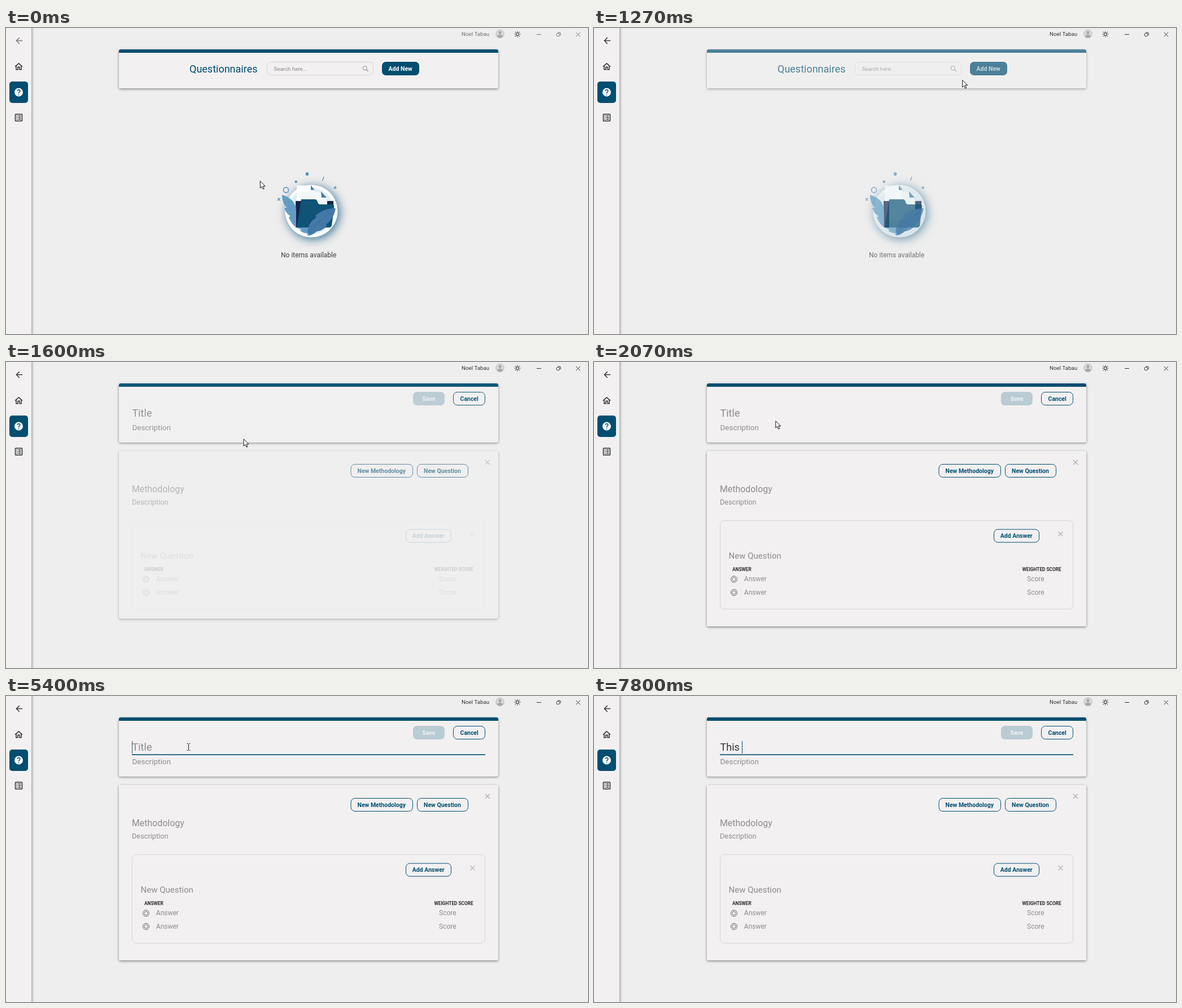
Recreate the animation shown at these times as an HTML page with a canvas. Size 1031 by 543 pixels, loop 8000 ms.

```html
<!DOCTYPE html>
<html lang="en">
<head>
<meta charset="utf-8">
<title>Questionnaires</title>
<style>
html, body { margin: 0; width: 100%; height: 100%; overflow: hidden; background: #eee; }
canvas { display: block; }
</style>
</head>
<body>
<canvas id="stage" width="1031" height="543"></canvas>
<script>
const ctx = document.getElementById('stage').getContext('2d');
const LOOP = 8000, STEP = 1000 / 15;
const BLUE = '#004e70', PAGE = '#eee', PANEL = '#f2f0f1', HINT = '#8d8c8c', DARK = '#2d2d2d';

const clamp = v => Math.max(0, Math.min(1, v));
const ramp = (t, from, to) => clamp((t - from) / (to - from));
const easeOut = v => 1 - (1 - v) ** 2;

function text(str, x, y, size, color, weight = 400) {
  ctx.font = `${weight} ${size}px Roboto, sans-serif`;
  ctx.fillStyle = color;
  ctx.fillText(str, x, y);
}

function box(x, y, w, h, r, fill, stroke) {
  ctx.beginPath();
  ctx.roundRect(x, y, w, h, r);
  if (fill) { ctx.fillStyle = fill; ctx.fill(); }
  if (stroke) { ctx.strokeStyle = stroke; ctx.lineWidth = 1; ctx.stroke(); }
}

function disc(x, y, r, fill, stroke, width = 1) {
  ctx.beginPath();
  ctx.arc(x, y, r, 0, Math.PI * 2);
  if (fill) { ctx.fillStyle = fill; ctx.fill(); }
  if (stroke) { ctx.strokeStyle = stroke; ctx.lineWidth = width; ctx.stroke(); }
}

function shape(d, fill, stroke, width = 1) {
  const p = new Path2D(d);
  if (fill) { ctx.fillStyle = fill; ctx.fill(p, 'evenodd'); }
  if (stroke) { ctx.strokeStyle = stroke; ctx.lineWidth = width; ctx.stroke(p); }
}

// Icon on a 24-unit grid, drawn 18 px wide around a centre.
function icon(d, x, y, color) {
  ctx.save();
  ctx.translate(x - 9, y - 9);
  ctx.scale(.75, .75);
  shape(d, color);
  ctx.restore();
}

function layer(alpha, draw) {
  if (alpha <= 0) return;
  ctx.save();
  ctx.globalAlpha = alpha;
  draw();
  ctx.restore();
}

function shadowed(color, blur, dx, dy, draw) {
  ctx.save();
  ctx.shadowColor = color;
  ctx.shadowBlur = blur;
  ctx.shadowOffsetX = dx;
  ctx.shadowOffsetY = dy;
  draw();
  ctx.restore();
}

// The opaque page colour keeps the shadow from showing through while fading.
function card(y, h) {
  const alpha = ctx.globalAlpha;
  shadowed('rgba(0,0,0,.46)', 4, 0, 1.5, () => box(200, y, 672, h, 3, PANEL));
  ctx.globalAlpha = 1;
  box(200, y, 672, h, 3, PAGE);
  ctx.globalAlpha = alpha;
  box(200, y, 672, h, 3, PANEL);
}

const topBar = () => box(200, 38, 672, 6, [3, 3, 0, 0], BLUE);

function outlined(label, x, y, w, tx) {
  box(x + .5, y + .5, w - 1, 23, 7, null, BLUE);
  text(label, tx, Math.floor(y + 16), 10.5, BLUE, 700);
}

const cross = (x, y, r, color, width = 1) =>
  shape(`M${x - r} ${y - r}L${x + r} ${y + r}M${x + r} ${y - r}L${x - r} ${y + r}`, null, color, width);

function sidebar(active) {
  shadowed('rgba(0,0,0,.5)', 5, .5, 0, () => {
    ctx.fillStyle = PANEL;
    ctx.fillRect(-10, -10, 55, 563);
  });
  icon('M20 11V13H8L13.5 18.5L12.08 19.92L4.16 12L12.08 4.08L13.5 5.5L8 11Z', 23.2, 22.5, active ? '#383838' : '#7b7b7b');
  icon('M12 5.69L17 10.19V18H15V12H9V18H7V10.19ZM12 3L2 12H5V20H11V14H13V20H19V12H22Z', 22.5, 68.5, DARK);
  box(6, 95, 33, 38, 5, BLUE);
  icon('M15.07 11.25L14.17 12.17C13.45 12.89 13 13.5 13 15H11V14.5C11 13.39 11.45 12.39 12.17 11.67L13.41 10.41C13.78 10.05 14 9.55 14 9A2 2 0 0 0 10 9H8A4 4 0 0 1 16 9C16 9.88 15.64 10.67 15.07 11.25M13 19H11V17H13M12 2A10 10 0 0 0 12 22A10 10 0 0 0 12 2Z', 22.5, 114, '#fff');
  icon('M11 15H17V17H11ZM7 7H9V9H7ZM11 11H17V13H11ZM11 7H17V9H11ZM7 11H9V13H7ZM7 15H9V17H7ZM5 3H19Q21 3 21 5V19Q21 21 19 21H5Q3 21 3 19V5Q3 3 5 3ZM5 5V19H19V5Z', 22.5, 159, DARK);
}

function titleBar(active) {
  const ink = active ? '#333' : '#707070';
  text('Noel Tabau', 807, 14, 9.75, ink);
  disc(875, 10.5, 7.2, '#dcdada', '#a9a9a9', .8);
  disc(875, 8.2, 2.6, '#a8a6a6');
  shape('M870 15.5Q870 11.8 875 11.8Q880 11.8 880 15.5Q875 18.5 870 15.5Z', '#a8a6a6');
  disc(906, 11, 2.6, null, '#333', 1.1);
  for (let i = 0; i < 8; i++) {
    const a = i * Math.PI / 4, c = Math.cos(a), s = Math.sin(a);
    shape(`M${906 + c * 4.3} ${11 + s * 4.3}L${906 + c * 5.8} ${11 + s * 5.8}`, null, '#333', 1.1);
  }
  shape('M940 11.5H948', null, ink, 1);
  box(975.5, 9.5, 5, 5, 1, null, ink);
  shape('M977.5 8H981Q982.3 8 982.3 9.5V13', null, ink, 1);
  cross(1013.5, 11.5, 3.7, ink);
}

function emptyArt() {
  const mark = '#5b93b8', leaf = '#629cc4';
  shadowed('rgba(0,78,122,.8)', 17, 3, 3, () => disc(541, 325, 46.5, '#fff'));
  disc(541, 325, 41.5, '#e2eef5');
  shape('M515 279.5H540L546 287V340H515Z', '#fafcfd');
  shape('M540 279L546.5 287.5H540Z', '#4b7b9d');
  shape('M521 291H558L568 301V340H521Z', '#f2f7fa');
  shape('M558 290L568 301H559Z', '#4b7b9d');
  shape('M513 307H523V354H514Z M569 307H580V322H569Z', '#14254a');
  shape('M489 296Q512 303 514 322V354Q506 348 501 336L504 334Q496 329 493 319L497 319Q489 310 489 296Z', leaf);
  shape('M523 304H547Q551 304 552 309Q553 313 557 313H578Q582 313 581 318L577 351Q576 354 572 354H515Z', '#0f5376');
  shape('M515 354H556Q551 365 535 369L533 364Q525 364 521 359L524 358Z', leaf);
  shape('M584 320Q562 320 548 333L549 337Q537 343 534 360L537 367Q546 366 549 361Q561 361 569 350L566 349Q580 340 584 320Z', '#4478a7');
  shape('M538 365Q551 343 575 328', null, '#386b9a', .8);
  disc(533.5, 259, 2.9, mark);
  disc(513.7, 272.7, 2.3, mark);
  disc(496, 287.5, 4.6, null, mark, 1.6);
  shape('M560.5 271L563 264M580.2 283.3H585.8M583 280.5V286', null, mark, 1.5);
  cross(483.3, 304, 2.2, mark, 1.5);
}

function listPage() {
  card(38, 69);
  topBar();
  text('Questionnaires', 325, 79, 18, BLUE);
  box(462.5, 60.5, 188, 23, 7, null, '#d6d4d4');
  text('Search here...', 474.5, 76, 9.75, '#8a8a8a');
  disc(635.8, 71.2, 3.4, null, '#9a9a9a', 1.1);
  shape('M638.3 73.7L641.6 77', null, '#9a9a9a', 1.3);
  box(666, 60, 66, 24, 7, BLUE);
  text('Add New', 677.5, 76, 10.5, '#fff', 700);
  emptyArt();
  text('No items available', 487, 407, 12, '#3c3c3c');
}

function typed(t) {
  const at = [7067, 7200, 7333, 7467, 7800];
  return 'This '.slice(0, at.filter(v => t >= v - 1).length);
}

function caretOn(t) {
  if (t >= 7060) return true;
  const flips = [2266, 2800, 3266, 3800, 4400, 4933, 5400, 6000, 6533, 7000];
  return flips.filter(v => t >= v - 1).length % 2 === 1;
}

function headForm(t) {
  card(38, 104.5);
  topBar();
  box(721, 53, 56, 24, 7, '#b9cbd3');
  text('Save', 737.5, 69, 10.5, '#eef1f3', 700);
  outlined('Cancel', 792, 53, 57, 804.5);
  const word = typed(t);
  text(word || 'Title', 223.5, 97, 18, word ? '#333' : HINT);
  if (caretOn(t)) {
    const w = word ? ctx.measureText(word).width : 0;
    ctx.fillStyle = word ? BLUE : '#33566a';
    ctx.fillRect(Math.round(223 + w), 80, 1, 22);
  }
  text('Description', 223.5, 121, 13.5, HINT);
  const half = 313 * easeOut(ramp(t, 2200, 2530));
  ctx.fillStyle = BLUE;
  ctx.fillRect(536 - half, 103.4, half * 2, 1.6);
}

function methodForm(t) {
  card(158, 311 - 46 * (1 - easeOut(ramp(t, 1467, 1760))));
  outlined('New Methodology', 610.5, 181, 110.5, 622.5);
  outlined('New Question', 728, 181, 91, 740);
  cross(853, 178, 4, '#aaa8a8', 1.1);
  text('Methodology', 223, 231, 15.9, HINT);
  text('Description', 223, 253, 12.75, HINT);
}

function questionForm() {
  box(223.5, 281.5, 625, 157, 7, null, '#d6d4d4');
  outlined('Add Answer', 708, 296.5, 81, 719.8);
  cross(826.5, 305, 4, '#b4b2b2', 1.1);
  text('New Question', 238.5, 349, 15, HINT);
  text('ANSWER', 245, 371, 8.3, DARK, 700);
  text('WEIGHTED SCORE', 758.5, 371, 8.3, DARK, 700);
  for (const y of [385.5, 409]) {
    disc(248, y, 5.6, null, '#6c6c6c', 1);
    disc(248, y, 3.2, null, '#6c6c6c', 1);
    text('Answer', 265.8, y + 3.5, 12, HINT);
    text('Score', 767, y + 3.5, 12, HINT);
  }
}

const PATH = [
  [0, 450, 271], [67, 196, 402], [133, 150, 580], [267, 300, 580], [333, 340, 528],
  [600, 560, 290], [867, 686, 125], [1067, 711, 76], [1200, 711, 76], [1467, 476.5, 140],
  [1733, 365, 132], [2067, 321.5, 104], [2267, 323.5, 90.5]
];

function pointerAt(t) {
  const i = PATH.findIndex(p => p[0] > t);
  if (i < 0) return PATH[PATH.length - 1].slice(1);
  const [t0, x0, y0] = PATH[i - 1], [t1, x1, y1] = PATH[i];
  const k = (t - t0) / (t1 - t0);
  return [x0 + (x1 - x0) * k, y0 + (y1 - y0) * k];
}

function pointer(t) {
  if (t >= 7060) return;
  const [x, y] = pointerAt(t);
  const onButton = t < 1260 && x > 666 && x < 732 && y > 60 && y < 84;
  ctx.save();
  ctx.translate(x, y);
  ctx.lineJoin = 'round';
  if (t >= 2190) {
    shape('M-3 -6H-1L0 -5L1 -6H3M0 -5V5M-3 6H-1L0 5L1 6H3', null, '#222', 1);
  } else if (onButton) {
    shape('M-1.6 1Q-1.6 0 -.3 0Q1 0 1 1.2V6Q2 4.8 3.2 6.2Q4.6 5.3 5.4 6.8Q7.6 6.2 7.6 8.4V11.5Q7.6 13.6 6 15V17H-1V15L-4 10.5Q-4.6 9 -3.4 8.8Q-2.4 8.8 -1.6 10Z', '#fff', '#111', 1);
    shape('M1.2 6V9M3.4 6.5V9M5.5 7V9', null, '#333', .7);
  } else {
    shape('M.3 .6V13L3.2 10.4L5.2 15L7.3 14.1L5.3 9.6H9.2Z', '#fff', '#111', 1);
  }
  ctx.restore();
}

function draw(t) {
  const active = t >= 1060;
  ctx.globalAlpha = 1;
  ctx.fillStyle = PAGE;
  ctx.fillRect(0, 0, 1031, 543);
  layer(1 - ramp(t, 1210, 1390), listPage);
  layer(ramp(t, 1370, 1615), () => headForm(t));
  layer(ramp(t, 1450, 1700), () => methodForm(t));
  layer(ramp(t, 1530, 1930), questionForm);
  sidebar(active);
  titleBar(active);
  pointer(t);
}

const start = performance.now();
function tick() {
  const t = (performance.now() - start) % LOOP;
  draw(Math.floor((t + 4) / STEP) * STEP);
  requestAnimationFrame(tick);
}
tick();
</script>
</body>
</html>
```
